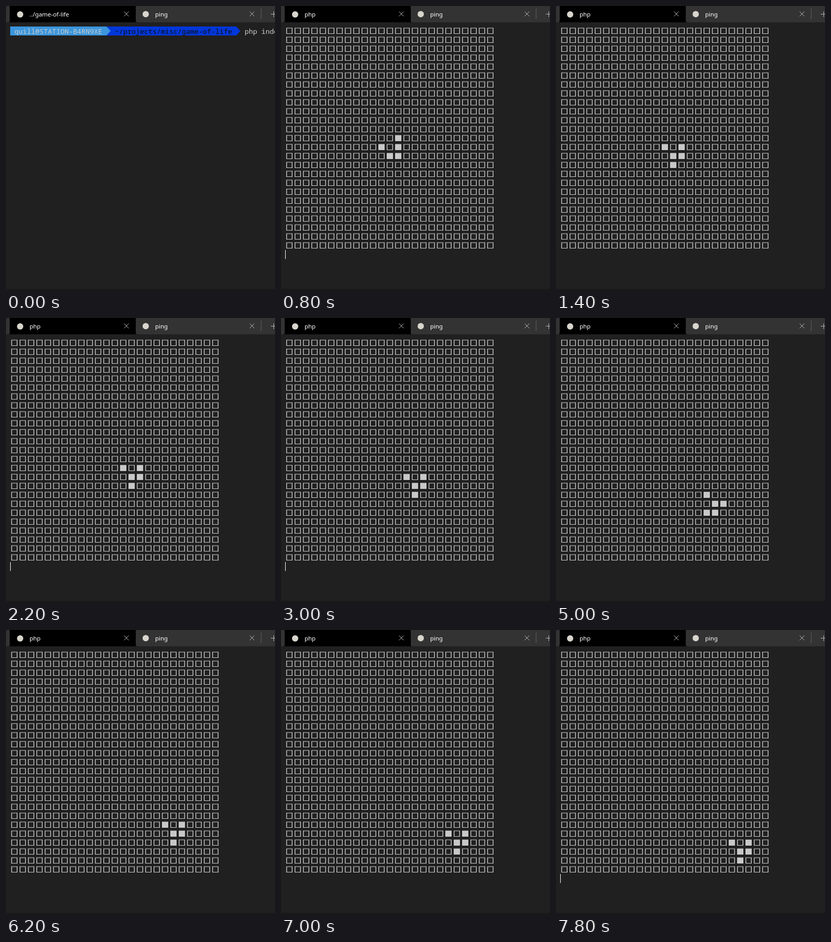
Recreate the animation shown at these times as an HTML page. Size 514 px wide and 540 px high, loop 8000 ms.

```html
<!DOCTYPE html>
<html lang="en">
<head>
<meta charset="utf-8">
<title>Game of life</title>
<style>
  html, body { margin: 0; width: 100%; height: 100%; overflow: hidden; background: #202020; }
  svg { display: block; width: 514px; height: 540px; }
  .tab { font: 11.45px "Noto Sans", "Open Sans", sans-serif; fill: #fff; }
  .mono { font: 13.333px "Noto Sans Mono", "DejaVu Sans Mono", monospace; fill: #ccc; white-space: pre; }
  .line { fill: none; stroke: #b4b4b4; stroke-width: 1; }
  #board { fill: #c8c8c8; fill-rule: evenodd; }
</style>
</head>
<body>
<svg viewBox="0 0 514 540">
  <rect width="514" height="540" fill="#202020"/>
  <rect y="538" width="514" height="2" fill="#1a1819"/>
  <rect width="514" height="31" fill="#333"/>
  <path d="M7 0H248V28Q248 31 251 31H4Q7 31 7 28Z" fill="#000"/>
  <circle cx="27" cy="16" r="6" fill="#d8d5cc"/>
  <circle cx="267" cy="15.500" r="6" fill="#d8d5cc"/>
  <text id="title" class="tab" x="45" y="20"></text>
  <text class="tab" x="285" y="20">ping</text>
  <path class="line" d="M225.500 10.500l9 9m0-9l-9 9M465.500 10.500l9 9m0-9l-9 9M506 15.500h10M511.500 10v11"/>
  <path d="M487.500 5v20" stroke="#606060"/>

  <g id="prompt">
    <path d="M192 39H440L448 47.500L440 56H192Z" fill="#0037da"/>
    <path d="M8 39H192L200 47.500L192 56H8Z" fill="#3a96dd"/>
    <text class="mono" x="16" y="52.500">quill@STATION-B4RN9XE</text>
    <text class="mono" x="208" y="52.500" style="fill:#0c0c0c">~/projects/misc/game-of-life</text>
    <text class="mono" x="456" y="52.500">php index.php</text>
  </g>
  <g id="board"></g>
  <rect id="cursor" x="8" y="464" width="1" height="17" fill="#fff"/>
</svg>
<script>
const LOOP = 8000, STEP = 200, SIZE = 25, BLINK = 1130;
const FULL = 'M2 2.5H14V14H2Z', HOLLOW = FULL + 'M3.4 3.6H12.6V13H3.4Z';
const $ = id => document.getElementById(id);
const title = $('title'), prompt = $('prompt'), board = $('board'), cursor = $('cursor');

const cells = Array.from({ length: SIZE * SIZE }, (_, i) => {
  const cell = document.createElementNS('http://www.w3.org/2000/svg', 'path');
  const x = 8 + 16 * (i % SIZE), y = 39 + 17 * Math.floor(i / SIZE);
  cell.setAttribute('transform', `translate(${x} ${y})`);
  return board.appendChild(cell);
});

// The first generation is a glider in the middle of the board.
const seed = new Set([[11, 11], [12, 12], [13, 12], [11, 13], [12, 13]].map(([x, y]) => y * SIZE + x));

function evolve(live) {
  const counts = new Map();
  for (const i of live)
    for (let dy = -1; dy <= 1; dy++)
      for (let dx = -1; dx <= 1; dx++) {
        const x = (i % SIZE + dx + SIZE) % SIZE;
        const y = (Math.floor(i / SIZE) + dy + SIZE) % SIZE;
        const n = y * SIZE + x;
        if (n !== i) counts.set(n, (counts.get(n) || 0) + 1);
      }
  return new Set([...counts].filter(([i, n]) => n === 3 || (n === 2 && live.has(i))).map(([i]) => i));
}

const generations = [seed];
while (generations.length < LOOP / STEP - 1) generations.push(evolve(generations.at(-1)));

const show = (el, on) => el.setAttribute('visibility', on ? 'visible' : 'hidden');
let last = -1;

function render(time) {
  const tick = Math.floor((time % LOOP) / STEP);
  if (tick === last) return;
  last = tick;
  const running = tick > 0;
  title.textContent = running ? 'php' : '../game-of-life';
  show(prompt, !running);
  show(board, running);
  const phase = (tick * STEP - 580 + BLINK) % BLINK;
  show(cursor, running && phase < BLINK / 2);
  if (running) {
    const live = generations[tick - 1];
    cells.forEach((cell, i) => cell.setAttribute('d', live.has(i) ? FULL : HOLLOW));
  }
}

const start = performance.now();
function loop() {
  render(performance.now() - start);
  requestAnimationFrame(loop);
}
loop();
</script>
</body>
</html>
```
